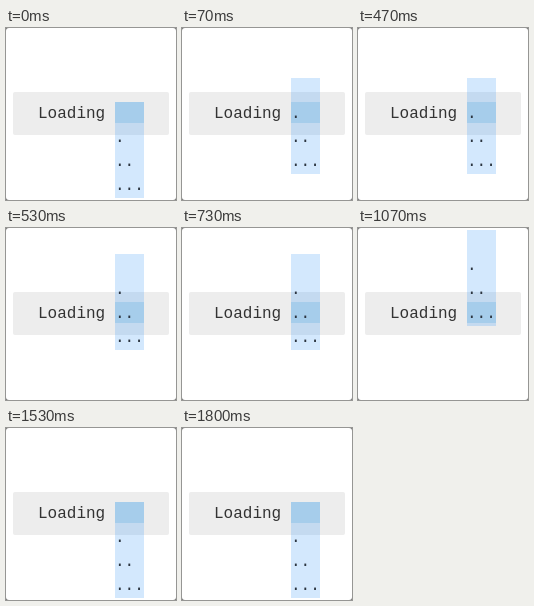
An HTML page with a canvas for the animation above (1990 ms loop, 170x172 px).

```html
<!DOCTYPE html>
<html lang="en">
<head>
<meta charset="utf-8">
<title>Loading</title>
<style>
  html, body { margin: 0; width: 100%; height: 100%; overflow: hidden; background: #fff; }
  canvas { display: block; }
</style>
</head>
<body>
<canvas id="stage" width="170" height="172"></canvas>
<script>
const ctx = document.getElementById('stage').getContext('2d');
const LOOP = 1990;
const STEPS = [70, 530, 1070, 1530];
const LINE = 24;
const column = { x: 109, w: 29, h: 4 * LINE };
const slot = { y: 74, h: 21 };
const panel = { x: 7, y: 64, w: 156, h: 43 };

function rect(x, y, w, h, color, radius = 0) {
  ctx.fillStyle = color;
  ctx.beginPath();
  ctx.roundRect(x, y, w, h, radius);
  ctx.fill();
}

// Part of the column that lies between two heights
function band(top, from, to, color) {
  const y = Math.max(top, from);
  const end = Math.min(top + column.h, to);
  if (end > y) rect(column.x, y, column.w, end - y, color);
}

function draw(time) {
  const line = STEPS.filter(t => time >= t).length % 4;
  const top = slot.y - line * LINE;

  rect(0, 0, 170, 172, '#777');
  rect(0, 0, 170, 172, '#fff', 3);
  rect(panel.x, panel.y, panel.w, panel.h, '#ededed', 2);

  band(top, 0, 172, '#d3e8fd');
  band(top, panel.y, panel.y + panel.h, '#c4daf0');
  band(top, slot.y, slot.y + slot.h, '#a6cdeb');

  ctx.font = '16px "Liberation Mono", monospace';
  ctx.fillStyle = '#333';
  ctx.fillText('Loading', 32, 90);
  ctx.fillStyle = '#2c3540';
  for (let n = 1; n < 4; n++) {
    ctx.fillText('.'.repeat(n), column.x, top + 16 + n * LINE);
  }
}

function tick() {
  draw(performance.now() % LOOP);
  requestAnimationFrame(tick);
}
tick();
</script>
</body>
</html>
```
